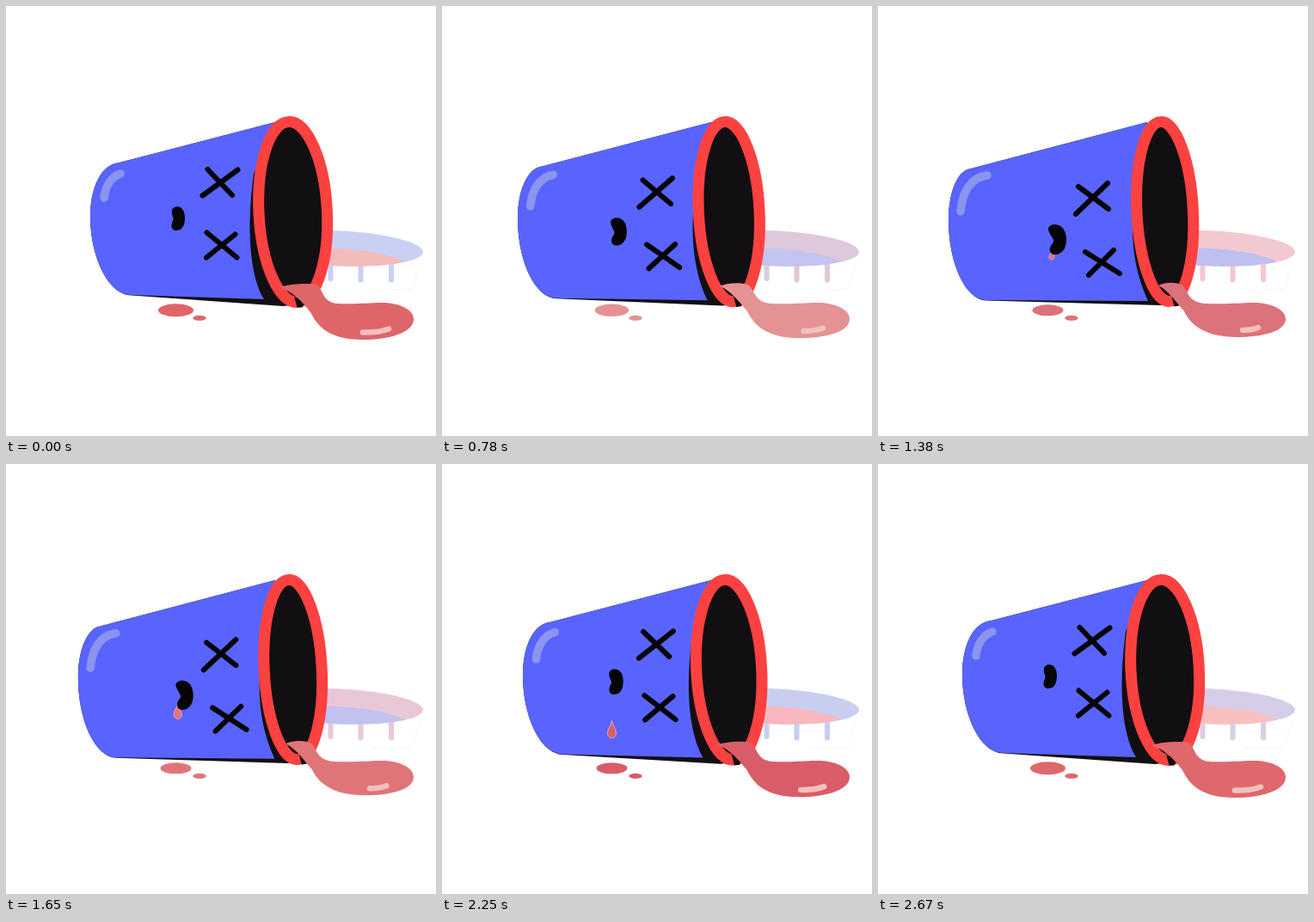
Recreate the animation shown at these times as an HTML page with a canvas. Size 500 px wide and 500 px high, loop 2.7 s.

```html
<!DOCTYPE html>
<html lang="en">
<head>
<meta charset="utf-8">
<title>Spilled cup</title>
<style>
html, body { margin: 0; width: 100%; height: 100%; overflow: hidden; background: #fff; }
canvas { display: block; width: 100vmin; height: 100vmin; }
</style>
</head>
<body>
<canvas id="stage" width="500" height="500"></canvas>
<script>
const ctx = document.getElementById('stage').getContext('2d');
const LOOP = 2700, STEP = 30;
const INK = '#110f12', BLUE = '#5964ff', RED = '#fc4240';

// Each shape has an upright pose and a squashed pose.
const SHAPES = {
  shell: ['M313 135 L132 182 C110 184 98 212 98 245 C98 290 118 336 146 336.5 L322 349 L340 347 L334 240 Z',
          'M313 135 L108 189 C92 191 82 217 82 249 C82 300 102 342 126 342.5 L328 348 L346 346 L334 240 Z'],
  front: ['M313 135 L132 182 C110 184 98 212 98 245 C98 290 118 336 146 336 L300 341 C284 315 279 262 288 195 Z',
          'M313 135 L108 189 C92 191 82 217 82 249 C82 300 102 342 126 342 L314 343 C302 315 293 285 297 235 Z'],
  gap: ['M335 338 L338.5 350.5 L344 350.5 L350 343 Z',
        'M341 336 L344.5 349.5 L350 348.5 L355 342 Z'],
  spill: ['M318 327 C330 323 352 322 361 324 C369 328 367 345 386 346 C410 347 420 345 436 345 C458 345 474 353 474 364 C474 380 445 388 415 388 C375 388 362 372 354 356 C345 344 332 331 318 327 Z',
          'M326 325 C334 321 346 321 352 324 C361 328 358 345 382 346 C410 347 420 345 436 345 C458 345 474 353 474 364 C474 379 445 385 418 385 C377 385 362 368 356 355 C347 345 338 331 326 325 Z'],
  spillShine: ['M415 379.5 Q433 380 445 375.5', 'M424 377 Q434 377 442 374'],
  cupShine: ['M114 223 C115 212 121 199 133 195', 'M96 239 C98 216 108 199 127 197'],
  eyes: ['M234.5 190 L263 220 M269.5 190.5 L228.5 220.5 M233.5 263.5 L268.5 292.5 M266.5 265.5 L233 292.5',
         'M233 210 L268 236 M267 206 L230 242 M241 286 L281 311 M274 284 L245 313'],
  mouth: ['M193 238 C194 231 208 230 208 246 C208 258 203 261 198 261 C191 261 192 253 194 250 C196 246 192 244 193 238 Z',
          'M198 260 C197 252 219 249 219 272 C219 285 211 290 204 289 C198 287 199 280 203 276 C207 272 200 268 198 260 Z']
};

const TIMES = [0, 360, 780, 1380, 1920, 2250, 2670];
const TINTS = {
  spill: ['#de6669', '#de6c73', '#e49294', '#dc727b', '#e17777', '#d85d69', '#de686b'],
  lid: ['#c9d0f4', '#d0c3d7', '#dec8db', '#f2c8d1', '#dec8db', '#c8cef0', '#d6cee8'],
  juice: ['#f2bcbc', '#dcc3cb', '#c3c4f0', '#bdc0f1', '#c4c4f0', '#fab7bf', '#f7c0bf']
};

const lerp = (a, b, k) => a + (b - a) * k;
const clamp = k => Math.max(0, Math.min(1, k));
const smooth = k => (k = clamp(k), k * k * (3 - 2 * k));

function shape(name, pose) {
  const [from, to] = SHAPES[name];
  const ends = to.match(/[\d.]+/g);
  let i = 0;
  return new Path2D(from.replace(/[\d.]+/g, n => lerp(+n, +ends[i++], pose).toFixed(2)));
}

function tint(name, t) {
  let i = 0;
  while (i < TIMES.length - 2 && t >= TIMES[i + 1]) i++;
  const k = clamp((t - TIMES[i]) / (TIMES[i + 1] - TIMES[i]));
  const channels = hex => [1, 3, 5].map(n => parseInt(hex.slice(n, n + 2), 16));
  const a = channels(TINTS[name][i]), b = channels(TINTS[name][i + 1]);
  return `rgb(${a.map((v, n) => Math.round(lerp(v, b[n], k))).join(',')})`;
}

function fill(path, color) {
  ctx.fillStyle = color;
  ctx.fill(path);
}

function stroke(path, color, width) {
  ctx.strokeStyle = color;
  ctx.lineWidth = width;
  ctx.stroke(path);
}

function oval(x, y, rx, ry, tilt = 0) {
  const path = new Path2D();
  path.ellipse(x, y, rx, ry, tilt, 0, Math.PI * 2);
  return path;
}

function drawLid(t) {
  const color = tint('lid', t);
  stroke(new Path2D('M482 296 L473 327 Q470 331 425 330'), '#f6f6fa', 1);
  stroke(new Path2D('M377.5 300 V317 M412.5 300 V318.5 M448 298 V318.5'), color, 6);
  const rim = oval(385, 281.7, 100, 20.5, 0.045);
  fill(rim, color);
  ctx.save();
  ctx.clip(rim);
  fill(oval(378, 303.5, 95, 22, 0.04), tint('juice', t));
  ctx.restore();
}

function drawPuddles(t, color) {
  const size = 1 - smooth((t - 500) / 800) + smooth((t - 2380) / 200);
  fill(oval(197.5, 353.8, lerp(18, 20.5, size), lerp(6.5, 7.5, size)), color);
  fill(oval(225, 362.8, 7.8, 3), color);
}

function drawDrop(t, color) {
  if (t < 1200 || t > 2410) return;
  const grow = smooth((t - 1150) / 650);
  const fall = Math.max(0, t - 2000);
  const settle = smooth((t - 1380) / 540);
  ctx.save();
  ctx.translate(lerp(202, 197.5, settle), lerp(284, 273, settle) + fall * fall * 4.16e-4);
  ctx.scale(lerp(0.5, 1, grow), lerp(0.4, 1, grow));
  const drop = new Path2D('M0 0 C1 6 5 9 5 14 A5 5.5 0 0 1 -5 14 C-5 9 -1 6 0 0 Z');
  fill(drop, color);
  stroke(drop, '#f0a4a8', 1);
  ctx.restore();
}

function draw(t) {
  const pose = (1 - Math.cos(t / LOOP * Math.PI * 2)) / 2;
  const wet = tint('spill', t);
  ctx.fillStyle = '#fff';
  ctx.fillRect(0, 0, 500, 500);
  ctx.lineCap = ctx.lineJoin = 'round';

  drawLid(t);
  drawPuddles(t, wet);
  fill(shape('shell', pose), INK);
  fill(shape('front', pose), BLUE);
  stroke(shape('cupShine', pose), '#8b94ee', 9.5);

  const mouthRim = oval(333.7, lerp(239.5, 239, pose), lerp(39.7, 32.7, pose), lerp(105, 104.5, pose), -0.05);
  fill(mouthRim, INK);
  stroke(mouthRim, RED, 13);
  fill(shape('gap', pose), INK);
  fill(shape('spill', pose), wet);
  stroke(shape('spillShine', pose), '#f2c0be', 6.5);

  stroke(shape('eyes', pose), '#050505', 6);
  drawDrop(t, wet);
  fill(shape('mouth', pose), '#050505');
}

const start = performance.now();
function tick() {
  const t = (performance.now() - start) % LOOP;
  draw(Math.floor(t / STEP) * STEP);
  requestAnimationFrame(tick);
}
tick();
</script>
</body>
</html>
```
